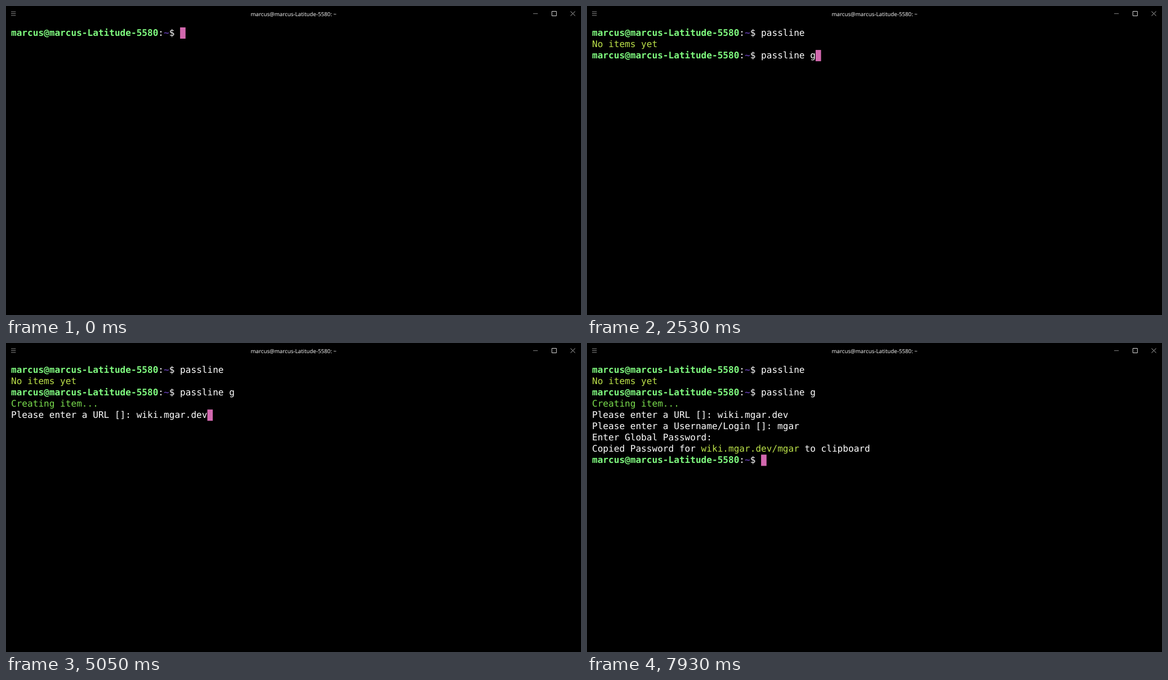
These frames come from a looping animation (1021 px wide and 549 px high, 8000 ms). An HTML page:

```html
<!DOCTYPE html>
<html lang="en">
<head>
<meta charset="utf-8">
<title>Terminal</title>
<style>
  html, body { margin: 0; width: 100%; height: 100%; overflow: hidden; background: #000; }
  svg { display: block; width: 100%; height: 100%; }
  text { white-space: pre; text-rendering: geometricPrecision; fill: #fff; }
  #lines { font: 16.08px "DejaVu Sans Mono", monospace; }
  #title { font: 500 9.75px "Open Sans", "Noto Sans", sans-serif; text-anchor: middle; }
  .icon { fill: none; stroke-width: 1; }
  .prompt { fill: #80fc80; font-weight: bold; }
  .path { fill: #5c38a6; font-weight: bold; }
  .lime { fill: #bce24a; }
  .green { fill: #7ade4e; }
</style>
</head>
<body>
<svg viewBox="0 0 1021 549">
  <rect width="1021" height="549"/>
  <path class="icon" stroke="#858585" d="M9 10.3h8.3M9 13.5h8.3M9 16.8h8.3"/>
  <path class="icon" stroke="#808080" d="M936 13.6h8.3"/>
  <path class="icon" stroke="#d8d8d8" d="M969.3 9.5h8v8h-8z"/>
  <path class="icon" stroke="#b0b0b0" d="M1002.5 9.5l8 8M1010.5 9.5l-8 8"/>
  <text id="title" x="510.7" y="17.6"></text>
  <rect id="cursor" width="9.681" height="20.04" fill="#d268ae"/>
  <g id="lines"></g>
</svg>
<script>
const LOOP = 8000, LEFT = 9, TOP = 38, CELL = 9.681, ROW = 20.04, BASELINE = 15;
const USER = 'marcus', HOST = USER + '-Latitude-5580', LOGIN = 'mgar';
const SITE = `wiki.${LOGIN}.dev`;
const PROMPT = `<prompt>${USER}@${HOST}<white>:<path>~<white>$ `;

// Evenly spaced keystrokes
const type = (start, keys, step = 80) => [...keys].map((key, i) => [start + i * step, key]);

// Each event appends text; <name> switches the style
const events = [
  [0, PROMPT],
  ...type(330, 'pa'), ...type(570, 'ssl'), [890, 'i'], [1050, 'ne'],
  [1210, '\n'],
  [1290, '<lime>No items yet\n' + PROMPT],
  [1950, 'passline'], [2280, ' '], [2530, 'g'],
  [2690, '\n<green>Creating item...\n<white>Please enter a URL []: '],
  [3440, 'w'], [3600, 'ik'], [3760, 'i'], [4090, '.'],
  ...type(4250, SITE.slice(5, 7)), ...type(4490, SITE.slice(7, 11)),
  [4890, SITE[11]], [5050, SITE[12]],
  [5210, '\n<white>Please enter a Username/Login []: '],
  [5620, LOGIN[0]], ...type(5780, LOGIN.slice(1)),
  [6100, '\n<white>Enter Global Password: '],
  [7930, `\n<white>Copied Password for <lime>${SITE}/${LOGIN}<white> to clipboard\n` + PROMPT]
];

const $ = id => document.getElementById(id);
const add = (parent, tag, attrs, text = '') => {
  const node = document.createElementNS('http://www.w3.org/2000/svg', tag);
  for (const name in attrs) node.setAttribute(name, attrs[name]);
  node.textContent = text;
  return parent.appendChild(node);
};

function drawLine(line, row) {
  const text = add($('lines'), 'text', { x: LEFT, y: TOP + BASELINE + row * ROW });
  line.split(/(<\w+>)/).reduce((style, part) => {
    if (/^<\w+>$/.test(part)) return part.slice(1, -1);
    if (part) add(text, 'tspan', { class: style }, part);
    return style;
  }, 'white');
}

let shown = 0;
function render(time) {
  const count = events.filter(([at]) => at <= time).length;
  if (count === shown) return;
  shown = count;
  const lines = events.slice(0, count).map(([, text]) => text).join('').split('\n');
  const last = lines.length - 1;
  const column = lines[last].replace(/<\w+>/g, '').length;
  $('lines').replaceChildren();
  lines.forEach(drawLine);
  $('cursor').setAttribute('x', LEFT + column * CELL);
  $('cursor').setAttribute('y', TOP + last * ROW);
}

$('title').textContent = `${USER}@${HOST}: ~`;
const start = performance.now();
function tick() {
  render((performance.now() - start) % LOOP);
  requestAnimationFrame(tick);
}
tick();
</script>
</body>
</html>
```
